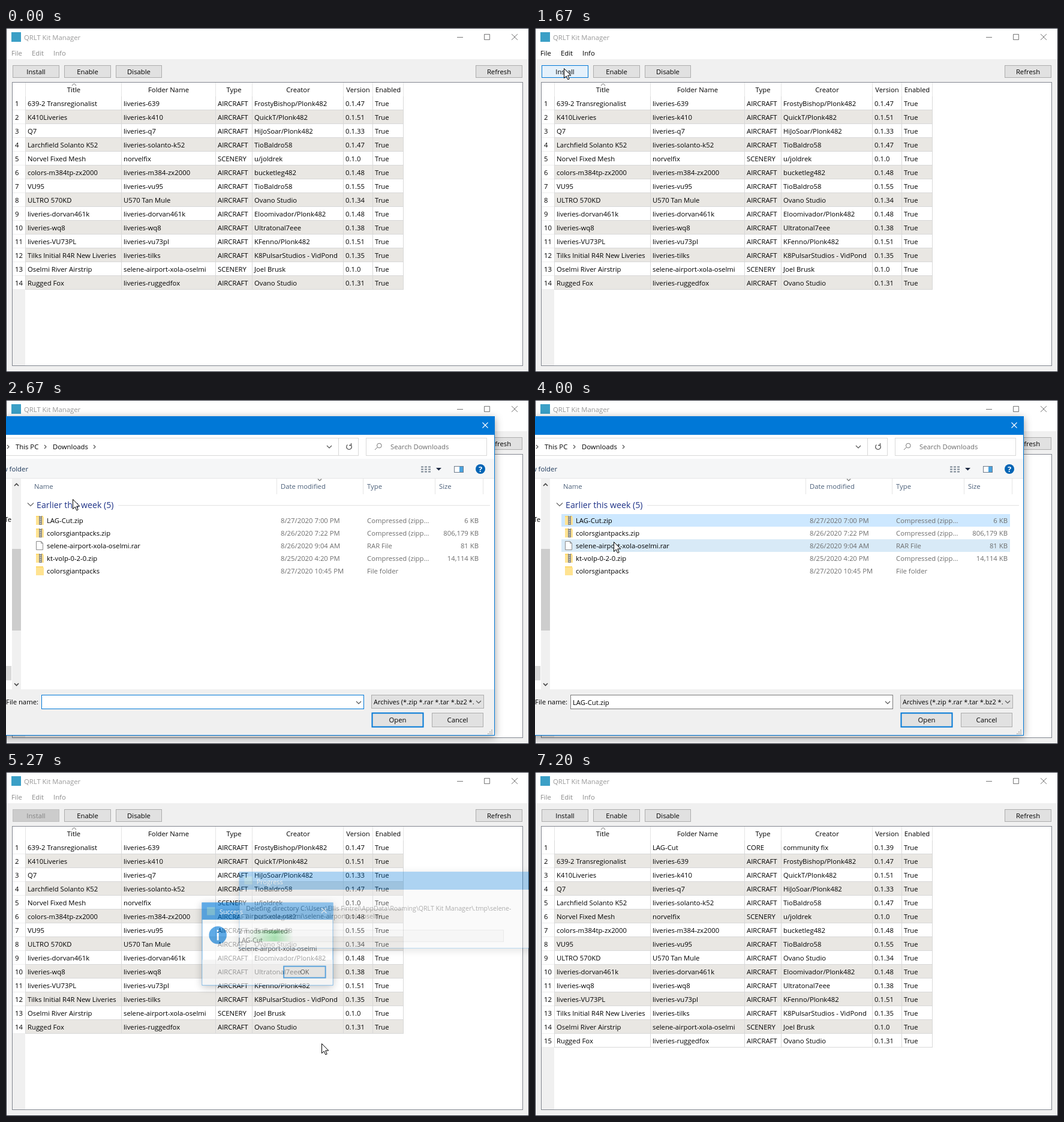
An HTML page for the animation above (7270 ms loop, 872x573 px).

```html
<!DOCTYPE html>
<html lang="en">
<head>
<meta charset="utf-8">
<title>Add-on installer</title>
<style>
html, body { margin: 0; width: 100%; height: 100%; overflow: hidden; background: #f0f0f0; }
svg { display: block; width: 872px; height: 573px; font: 11.3px "Open Sans", "Noto Sans", sans-serif; }
text { white-space: pre; }
.bar { fill: #fff; }
.cap { fill: #999; }
.ctl { fill: none; stroke: #777; }
.edge { fill: none; stroke: #2b2d38; }
.menu { fill: #8c8c8c; }
.active .bar { fill: #0078d7; }
.active .cap { fill: #fff; }
.active .ctl { stroke: #fff; }
.active .edge { stroke: #0c64ab; }
.ready .menu { fill: #000; }
.btn rect { fill: #e1e1e1; stroke: #adadad; }
.btn.main rect { stroke: #0078d7; stroke-width: 2; }
.btn.hover rect { fill: #e5f1fb; stroke: #0078d7; }
.btn.press rect { fill: #cce4f7; stroke: #005499; }
.btn.off rect { fill: #ccc; stroke: #bfbfbf; }
.btn.off text { fill: #838383; }
.win { filter: drop-shadow(0 3px 7px rgba(0, 0, 0, .38)); }
</style>
</head>
<body>
<svg id="stage" viewBox="0 0 872 573"></svg>
<script>
const LOOP = 7270, BLUE = '#0078d7', GREY = '#6d6d6d';

const fill = (x, y, w, h, color, attrs = '') =>
  `<rect x="${x}" y="${y}" width="${w}" height="${h}" fill="${color}" ${attrs}/>`;
const box = (x, y, w, h, color, stroke, attrs = '') =>
  fill(x + .5, y + .5, w - 1, h - 1, color, `stroke="${stroke}" ${attrs}`);
const text = (x, y, s, color = '#000', attrs = '') =>
  `<text x="${x}" y="${y}" fill="${color}" ${attrs}>${s}</text>`;
const mid = (x, y, s, color) => text(x, y, s, color, 'text-anchor="middle"');
const end = (x, y, s, color) => text(x, y, s, color, 'text-anchor="end"');
const line = (d, color, w = 1, inside = 'none', attrs = '') =>
  `<path d="${d}" fill="${inside}" stroke="${color}" stroke-width="${w}" ${attrs}/>`;
const down = (x, y, color = '#555', r = 4) => line(`M${x - r} ${y - r / 2}l${r} ${r}l${r} ${-r}`, color, 1.2);
const right = (x, y) => line(`M${x - 2} ${y - 3}l3 3l-3 3`, '#555', 1.2);
const cross = (x, y, r, color) => line(`M${x - r} ${y - r}l${2 * r} ${2 * r}m0 ${-2 * r}l${-2 * r} ${2 * r}`, color, 1.1);
const button = (id, x, y, w, h, label, kind = '') =>
  `<g id="${id}" class="btn ${kind}">${box(x, y, w, h, '', '')}${mid(x + w / 2, y + h / 2 + 4.3, label)}</g>`;
const logo = (x, y, s) => fill(x, y, s, s, '#3b9fc6');

// Main window
const mods = `639-2 Transregionalist|liveries-639|A|FrostyBishop/Plonk482|47
K410Liveries|liveries-k410|A|QuickT/Plonk482|51
Q7|liveries-q7|A|HiJoSoar/Plonk482|33
Larchfield Solanto K52|liveries-solanto-k52|A|TioBaldro58|47
Norvel Fixed Mesh|norvelfix|S|u/joldrek|0
colors-m384tp-zx2000|liveries-m384-zx2000|A|bucketleg482|48
VU95|liveries-vu95|A|TioBaldro58|55
ULTRO 570KD|U570 Tan Mule|A|Ovano Studio|34
liveries-dorvan461k|liveries-dorvan461k|A|Eloomivador/Plonk482|48
liveries-wq8|liveries-wq8|A|Ultratonal7eee|38
liveries-VU73PL|liveries-vu73pl|A|KFenno/Plonk482|51
Tilks Initial R4R New Liveries|liveries-tilks|A|K8PulsarStudios - VidPond|35
Oselmi River Airstrip|selene-airport-xola-oselmi|S|Joel Brusk|0
Rugged Fox|liveries-ruggedfox|A|Ovano Studio|31`.split('\n').map(r => r.split('|'));
const added = ['', 'LAG-Cut', 'C', 'community fix', '39'];
const kinds = { A: 'AIRCRAFT', S: 'SCENERY', C: 'CORE' };
const edges = [32, 192, 349, 410, 562, 611, 662];

function table(id, rows) {
  const bottom = 114 + 23 * rows.length;
  let s = fill(11, bottom, 21, 562 - bottom, '#f0f0f0');
  rows.forEach(([title, folder, kind, by, ver], i) => {
    const y = 114 + 23 * i;
    if (i % 2) s += fill(33, y, 629, 23, '#e9e7e3');
    s += fill(33, y + 22, 630, 1, '#d8d8d8') + fill(11, y + 22, 21, 1, '#eee') + text(15, y + 16, i + 1);
    [title, folder, kinds[kind], by, '0.1.' + ver, 'True']
      .forEach((v, c) => s += text(edges[c] + 4, y + 16, v));
  });
  edges.forEach(x => s += fill(x, 114, 1, bottom - 114, '#d8d8d8'));
  return `<g id="${id}">${s}</g>`;
}

const heads = { Title: 113, 'Folder Name': 271, Type: 380, Creator: 487, Version: 587, Enabled: 637 };
const mainWindow =
  fill(0, 0, 872, 573, '#f0f0f0') + fill(0, 31, 872, 21, '#fff') +
  '<rect class="bar" width="872" height="31"/>' + logo(9, 7, 16) +
  '<text class="cap" x="30" y="20">QRLT Kit Manager</text>' +
  '<path class="ctl" d="M752 15.5h10M797.5 10.5h9v9h-9zM843 10l10 10m0-10l-10 10"/>' +
  [['File', 9], ['Edit', 43], ['Info', 79]].map(([s, x]) => `<text class="menu" x="${x}" y="46">${s}</text>`).join('') +
  button('install', 11, 62, 78, 21, 'Install') + button('enable', 97, 62, 78, 21, 'Enable') +
  button('disable', 183, 62, 77, 21, 'Disable') + button('refresh', 783, 62, 78, 21, 'Refresh') +
  box(10, 90, 852, 473, '#fff', '#828790') +
  edges.map(x => fill(x, 91, 1, 23, '#e5e5e5')).join('') +
  Object.entries(heads).map(([s, x]) => mid(x, 107, s)).join('') +
  line('M110 96l3.5-3.5l3.5 3.5', '#666') +
  table('before', mods) + table('after', [added, ...mods]) +
  '<rect class="edge" x=".5" y=".5" width="871" height="572"/>';

// File dialog
const files = [
  ['LAG-Cut.zip', '8/27/2020 7:00 PM', 'zip', '6 KB'],
  ['colorsgiantpacks.zip', '8/26/2020 7:22 PM', 'zip', '806,179 KB'],
  ['selene-airport-xola-oselmi.rar', '8/26/2020 9:04 AM', 'rar', '81 KB'],
  ['kt-volp-0-2-0.zip', '8/25/2020 4:20 PM', 'zip', '14,114 KB'],
  ['colorsgiantpacks', '8/27/2020 10:45 PM', 'dir', '']
];
const fileKinds = { zip: 'Compressed (zipp...', rar: 'RAR File', dir: 'File folder' };

function icon(kind, y) {
  if (kind == 'rar') return line(`M50.5 ${y + .5}h8l3 3v11h-11zM58.5 ${y + .5}v3h3`, '#8a8a8a', 1, '#fff');
  const folder = fill(50, y, 12, 15, '#ffd96b') + fill(50, y + 2, 13, 13, '#ffe391');
  return kind == 'dir' ? folder
    : folder + fill(55, y, 5, 15, '#8d8d86') + line(`M57.5 ${y}v15`, '#eee', 2, 'none', 'stroke-dasharray="1 2"');
}

const fileRows = files.map(([name, date, kind, size], i) => {
  const y = 190 + 21 * i;
  return fill(44, y, 748, 21, 'none', `id="row${i}"`) + icon(kind, y + 3) +
    text(68, y + 15, name) + text(458, y + 15, date, GREY) +
    text(602, y + 15, fileKinds[kind], GREY) + end(788, y + 15, size, GREY);
}).join('');

let grip = '';
for (let i = 0; i < 3; i++) for (let j = 0; j <= i; j++) grip += fill(809 - 3 * j, 549 + 3 * i, 2, 2, '#bbb');

const fileDialog =
  fill(-210, 27, 1025, 532, BLUE) + fill(-209, 58, 1023, 500, '#fff') + cross(799, 42, 4.5, '#fff') +
  box(-150, 63, 738, 30, '#fff', '#d9d9d9') + fill(554, 64, 1, 28, '#d9d9d9') +
  right(4, 78) + text(16, 82, 'This PC') + right(66, 78) + text(78, 82, 'Downloads') + right(148, 78) +
  down(539, 78) + line('M574.5 74.5a4.3 4.3 0 1 1-5 0M575.5 72v3.5h-3.5', '#555', 1.3) +
  box(600, 63, 202, 30, '#fff', '#d9d9d9') +
  line('M615 83l4-4m-.5-3a3.8 3.8 0 1 1 7.6 0a3.8 3.8 0 1 1-7.6 0', '#777') + text(641, 82, 'Search Downloads', GREY) +
  fill(-209, 98, 1023, 33, '#f5f6f7') + fill(-209, 130, 1023, 1, '#e6e7e8') + end(37, 119, 'New folder', '#1e395b') +
  line('M692 111.5h4m2 0h4m2 0h4M692 115.5h4m2 0h4m2 0h4M692 119.5h4m2 0h4m2 0h4', '#7c8794', 2) +
  '<path d="M717 113h9l-4.5 4.5z" fill="#1e2a44"/>' +
  box(747, 110, 16, 11, '#fff', '#6f7c8c') + fill(756, 111, 6, 9, '#4aa3df') +
  '<circle cx="791" cy="115" r="8" fill="#0064b5"/>' +
  text(791, 119.5, '?', '#fff', 'text-anchor="middle" font-size="13" font-weight="700"') +
  end(9, 203, 'on Te') + fill(-209, 443, 218, 24, '#d9d9d9') +
  fill(10, 131, 15, 351, '#f0f0f0') + fill(10, 248, 15, 136, '#cdcdcd') +
  line('M14 143l3.5-3.5l3.5 3.5M14 472l3.5 3.5l3.5-3.5', '#444', 1.6) +
  [451, 595, 715, 795].map(x => fill(x, 131, 1, 26, '#e5e5e5')).join('') +
  [['Name', 47], ['Date modified', 458], ['Type', 602], ['Size', 722]].map(([s, x]) => text(x, 148, s, '#4c607a')).join('') +
  down(523, 133, '#777', 3) +
  fill(30, 164, 762, 22, 'none', 'id="group"') + down(41, 174, '#666', 5) +
  text(51, 180, 'Earlier this week (5)', '#1e3287', 'font-size="14.2"') + fill(187, 175, 620, 1, '#e2e2e2') +
  fileRows +
  fill(-209, 482, 1023, 76, '#f0f0f0') + end(54, 507, 'File name:') +
  box(59, 491, 538, 24, '#fff', BLUE, 'id="field"') + fill(62, 496, 0, 15, BLUE, 'id="mark"') +
  text(63, 508, '', '#000', 'id="name"') + down(588, 504) +
  box(609, 491, 188, 23, '#e1e1e1', '#adadad') +
  text(613, 507, 'Archives (*.zip *.rar *.tar *.bz2 *.', '#000', 'font-size="11"') + down(788, 503) +
  button('open', 610, 521, 86, 24, 'Open', 'main') + button('cancel', 710, 521, 86, 24, 'Cancel') + grip;

// Message windows
const progressWindow =
  box(380, 164, 510, 132, '#fff', BLUE) + fill(380, 164, 510, 31, BLUE) + logo(389, 172, 14) +
  text(410, 185, 'Progress', '#fff') + fill(381, 195, 508, 100, '#f0f0f0') +
  text(392, 231, 'Deleting directory C:\\Users\\Ellis Fintrel\\AppData\\Roaming\\QRLT Kit Manager\\.tmp\\selene-', '#000', 'font-size="11"') +
  text(392, 244, 'airport-xola-oselmi\\selene-airport-xola-oselmi', '#000', 'font-size="11"') +
  box(392, 264, 445, 21, '#e6e6e6', '#bcbcbc') + fill(0, 265, 80, 19, 'url(#glow)', 'id="chunk"');

const successWindow =
  box(321, 214, 230, 145, '#fff', BLUE) + fill(321, 214, 230, 30, BLUE) + logo(330, 222, 14) +
  text(352, 234, 'Success', '#fff') + cross(535, 228, 4.5, '#fff') +
  '<circle cx="349" cy="271" r="15.5" fill="#0078d7"/>' + fill(347.5, 267, 3, 13, '#fff') + fill(347.5, 262, 3, 3, '#fff') +
  text(385, 268, '2 mods installed!') + text(385, 284, 'LAG-Cut') + text(385, 299, 'selene-airport-xola-oselmi') +
  fill(322, 314, 228, 44, '#f0f0f0') + button('ok', 464, 325, 74, 21, 'OK', 'main');

const stage = document.getElementById('stage');
stage.innerHTML =
  `<defs><linearGradient id="glow"><stop stop-color="#06b025" stop-opacity="0"/>
  <stop offset=".6" stop-color="#06b025"/><stop offset="1" stop-color="#06b025" stop-opacity="0"/></linearGradient></defs>
  ${mainWindow}<g id="files" class="win">${fileDialog}</g><g id="success" class="win">${successWindow}</g>
  <g id="progress" class="win">${progressWindow}</g>
  <path id="cursor" d="M.5.5V16.5L4.2 13L6.8 18.8L9.2 17.8L6.7 12H11.8Z" fill="#fff" stroke="#000"/>`;

const $ = id => document.getElementById(id);
const show = (id, on) => $(id).style.display = on ? '' : 'none';
const within = (t, a, b) => t >= a && t < b;
const set = (id, name, value) => $(id).setAttribute(name, value);

// Pointer path: time, x, y
const path = [
  [600, 59, 13], [730, 36, 53], [1070, 37, 54], [1330, 48, 67], [2130, 48, 67], [2530, 95, 131], [2670, 111, 165],
  [2930, 118, 192], [3330, 118, 192], [3600, 131, 236], [4130, 131, 236], [4530, 640, 527], [4800, 640, 527],
  [5200, 526, 452], [5530, 526, 452], [5800, 542, 400], [6130, 500, 331], [6530, 500, 331], [6800, 700, 580]
];
function pointer(t) {
  const i = path.findIndex(p => p[0] > t);
  if (i < 0) return path[path.length - 1].slice(1);
  if (i == 0) return [-50, -50];
  const [a, ax, ay] = path[i - 1], [b, bx, by] = path[i];
  let k = (t - a) / (b - a);
  k = k * k * (3 - 2 * k);
  return [ax + (bx - ax) * k, ay + (by - ay) * k].map(Math.round);
}

// Windows grow while fading in and shrink while fading out
function pop(id, t, opens, closes, cx, cy) {
  const p = Math.min(1, (t - opens) / 250), q = Math.max(0, (t - closes) / 190);
  show(id, p > 0 && q < 1);
  const scale = .9 + .1 * p - .05 * q;
  set(id, 'transform', scale == 1 ? '' : `translate(${cx} ${cy}) scale(${scale}) translate(${-cx} ${-cy})`);
  set(id, 'opacity', Math.max(0, Math.min(1, p * 1.2) - q));
}

function draw(now) {
  // The picture advances at 15 steps a second
  const t = Math.round(Math.floor(now % LOOP * .015 + .06) * 20 / 3) * 10;
  const [x, y] = pointer(t);

  stage.classList.toggle('active', within(t, 1470, 1670) || within(t, 4730, 4870) || within(t, 6330, 7200));
  stage.classList.toggle('ready', within(t, 1470, 1870) || within(t, 6330, 7200));
  const state = within(t, 1870, 6330) ? 'off' : within(t, 1470, 1530) ? 'press' : within(t, 1200, 1870) ? 'hover' : '';
  set('install', 'class', 'btn ' + state);
  show('before', t < 6400);
  show('after', t >= 6400);

  pop('files', t, 1830, 4600, 310, 292.5);
  pop('progress', t, 4830, 5140, 634, 230);
  pop('success', t, 5140, 6270, 436, 286.5);

  const hovered = t > 2700 && x < 792 ? Math.floor((y - 190) / 21) : -1;
  files.forEach((_, i) => {
    const picked = i == 0 && t >= 3000 || i == 2 && t >= 4130;
    set('row' + i, 'fill', picked ? (t >= 4600 ? '#d9d9d9' : '#cde8ff') : hovered == i ? '#d8eaf7' : 'none');
  });
  set('group', 'fill', within(t, 2730, 2870) && within(y, 168, 186) ? '#e5f3ff' : 'none');
  set('field', 'stroke', t < 3330 ? BLUE : '#7a7a7a');

  const name = $('name'), marked = t >= 4600;
  name.textContent = t < 3000 ? '' : t < 4130 ? files[0][0] : `"${files[2][0]}" "${files[0][0]}"`;
  set('name', 'fill', marked ? '#fff' : '#000');
  set('mark', 'width', marked ? name.getComputedTextLength() + 2 : 0);
  set('open', 'class', 'btn main' + (t >= 4600 ? ' press' : t >= 4470 ? ' hover' : ''));
  set('ok', 'class', 'btn main' + (t >= 6270 ? ' press' : t >= 6070 ? ' hover' : ''));
  set('chunk', 'x', 386 + Math.max(0, t - 4870) * .02);

  set('cursor', 'transform', `translate(${x} ${y})`);
  show('cursor', within(t, 600, 6800));
}

const start = performance.now();
(function tick() {
  draw(performance.now() - start);
  requestAnimationFrame(tick);
})();
</script>
</body>
</html>
```
